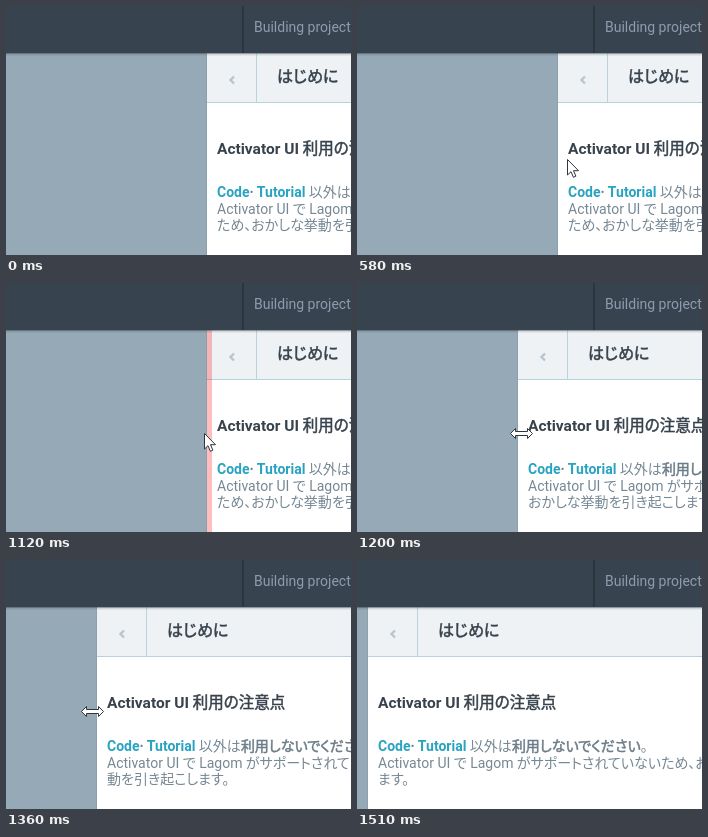
Animation, 345 px wide and 249 px high, one loop 2340 ms. Source, as an HTML page:

```html
<!DOCTYPE html>
<html lang="ja">
<head>
<meta charset="utf-8">
<style>
  html, body { margin: 0; width: 100%; height: 100%; overflow: hidden; }
  svg { display: block; width: 345px; height: 249px; }
  text {
    font: 14px Roboto, "Noto Sans CJK JP", "Noto Sans CJK", sans-serif;
    font-feature-settings: "palt";
    white-space: pre;
    fill: #768894;
  }
  .title { font-size: 16px; fill: #37424c; }
  .heading { font-size: 15.5px; font-weight: 700; fill: #37424c; }
  .link { font-weight: 700; fill: #29a3c2; }
  .strong { fill: #6b7c87; }
  /* Kana and kanji are only slightly thickened, not truly bold */
  .thick { font-weight: 400; stroke: currentColor; stroke-width: .5; }
  .title, .heading { color: #37424c; }
  .strong { color: #6b7c87; }
  .cursor { fill: #fff; stroke: #30363c; stroke-width: 1; }
</style>
</head>
<body>
<svg viewBox="0 0 345 249">
  <rect width="345" height="249" fill="#95a9b6"/>

  <g id="panel">
    <rect x="-1" y="47" width="1" height="202" fill="#8b9fac"/>
    <rect y="47" width="345" height="202" fill="#fff"/>
    <rect y="47" width="345" height="49" fill="#eef2f5"/>
    <rect y="96" width="345" height="1" fill="#b6d3db"/>
    <rect x="49" y="47" width="1" height="49" fill="#b9d5dc"/>
    <path d="M27 70.5L23.5 74L27 77.5" fill="none" stroke="#b8c5cf" stroke-width="2.4"/>
    <text class="title thick" x="70" y="76">はじめに</text>
    <text class="heading" x="10" y="148">Activator UI <tspan class="thick">利用の注意点</tspan></text>
    <text x="10" y="191"><tspan class="link">Code</tspan><tspan class="strong" font-weight="700">· </tspan><tspan class="link">Tutorial</tspan> 以外は<tspan class="strong thick">利用しないでください</tspan>。</text>
    <text id="line2" x="10" y="208"></text>
    <text id="line3" x="10" y="224"></text>
    <rect id="highlight" y="47" width="5" height="202" fill="#f00"/>
  </g>

  <rect width="345" height="47" fill="#37444f"/>
  <rect y="47" width="345" height="1" fill="#37444f" opacity=".5"/>
  <rect y="48" width="345" height="1" fill="#37444f" opacity=".16"/>
  <rect y="49" width="345" height="1" fill="#37444f" opacity=".07"/>
  <rect x="236" width="2" height="47" fill="#29353f"/>
  <text x="248" y="26" style="fill:#8f9bad">Building project</text>

  <path id="arrow" class="cursor" d="M.5 .5V16L4 12.7L6.4 18.3L8.9 17.2L6.5 11.7H11.5Z"/>
  <path id="resize" class="cursor" d="M-10.5 .5L-5.5 -4.5V-1.5H6.5V-4.5L11.5 .5L6.5 5.5V2.5H-5.5V5.5Z"/>
</svg>

<script>
const LOOP = 2340;
const intro = "Activator UI で Lagom がサポートされていない";
const rest = "ため、おかしな挙動を引き起こします。";

// Screen capture states: start ms, panel left edge, cursor, cursor x, y, highlight opacity
const states = [
  [0, 201],
  [110, 201, "arrow", 256, 238],
  [190, 201, "arrow", 249, 214],
  [270, 201, "arrow", 238, 190],
  [350, 201, "arrow", 229, 172],
  [430, 201, "arrow", 221, 162],
  [510, 201, "arrow", 214, 156],
  [580, 201, "arrow", 210, 153],
  [660, 201, "resize", 206, 151, .1],
  [740, 201, "resize", 204, 150, .2],
  [1120, 201, "arrow", 198, 150, .26],
  [1200, 161, "resize", 164, 150],
  [1280, 121, "resize", 123, 150],
  [1360, 91, "resize", 86, 151],
  [1440, 61, "arrow", 45, 154],
  [1510, 11]
];

// Characters of the closing words that fit on the second line at each panel edge
const fitted = { 201: 0, 161: 3, 121: 6, 91: 8, 61: 11, 11: 15 };

const el = id => document.getElementById(id);
const moveTo = (id, x, y) => el(id).setAttribute("transform", `translate(${x} ${y})`);
let shown;

function draw(state) {
  const [, edge, cursor, x, y, glow = 0] = state;
  moveTo("panel", edge, 0);
  el("line2").textContent = intro + rest.slice(0, fitted[edge]);
  el("line3").textContent = rest.slice(fitted[edge]);
  el("highlight").setAttribute("opacity", glow);
  for (const id of ["arrow", "resize"]) {
    el(id).style.display = id === cursor ? "" : "none";
  }
  if (cursor) moveTo(cursor, x, y);
}

const start = performance.now();
function tick() {
  const time = (performance.now() - start) % LOOP;
  const state = states.findLast(([from]) => from <= time);
  if (state !== shown) draw(shown = state);
  requestAnimationFrame(tick);
}
tick();
</script>
</body>
</html>
```
